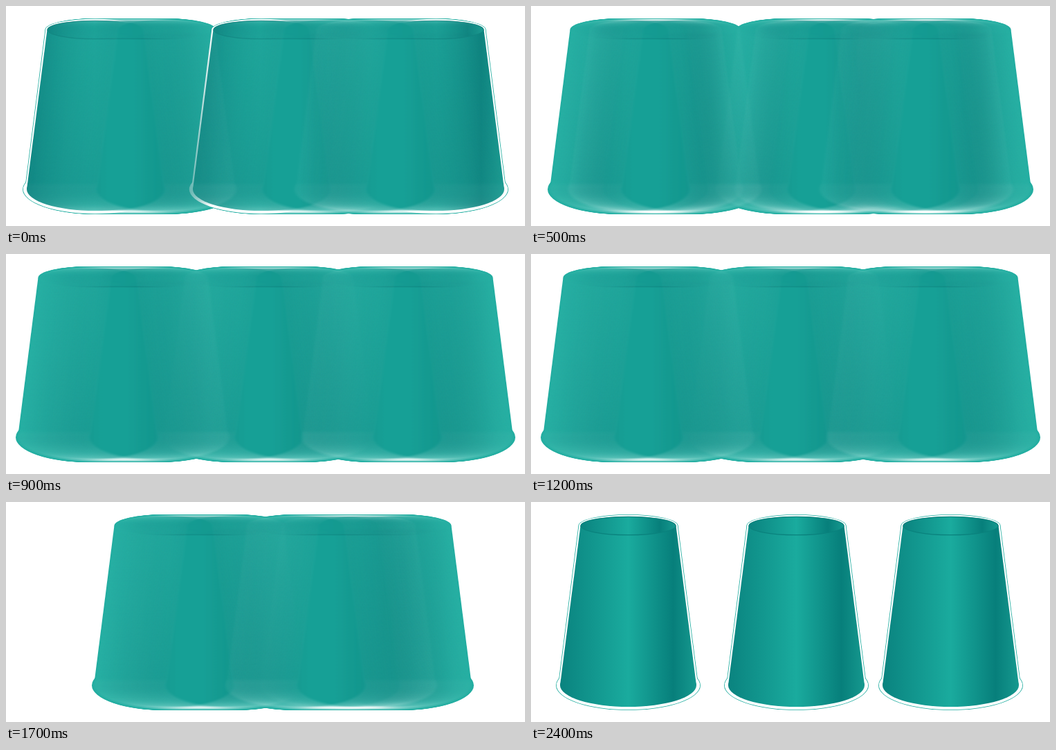
Animation of 750 by 318 pixels, one loop 2900 ms. Source, as an HTML page with a canvas:

```html
<!DOCTYPE html>
<html lang="en">
<head>
<meta charset="utf-8">
<title>Shuffling cups</title>
<style>
  html, body { margin: 0; width: 100%; height: 100%; overflow: hidden; background: #fff; }
  canvas { display: block; }
</style>
</head>
<body>
<canvas id="stage" width="750" height="318"></canvas>
<script>
const WIDTH = 750, HEIGHT = 318;
const EDGE = '#20ada0', RIM = '#0a827d';
const REACH = 51.5; // half the distance a cup travels in one blurred pose
const SLOT = 100, LOOP = 2900;

function newLayer(width = WIDTH) {
  const canvas = document.createElement('canvas');
  canvas.width = width;
  canvas.height = HEIGHT;
  return canvas.getContext('2d');
}

function fillTapered(ctx, x, top, bottom) {
  ctx.beginPath();
  ctx.ellipse(x, top.y, top.rx, top.ry, 0, 0, 2 * Math.PI);
  ctx.fill();
  ctx.beginPath();
  ctx.moveTo(x - top.rx, top.y);
  ctx.lineTo(x + top.rx, top.y);
  ctx.lineTo(x + bottom.side, bottom.y);
  ctx.lineTo(x - bottom.side, bottom.y);
  ctx.fill();
  ctx.beginPath();
  ctx.ellipse(x, bottom.y, bottom.rx, bottom.ry, 0, 0, 2 * Math.PI);
  ctx.fill();
}

function fillOutline(ctx, x, color, inset = 0) {
  ctx.fillStyle = color;
  fillTapered(ctx, x,
    { y: 34, rx: 72 - inset, ry: 16 - inset },
    { y: 265, rx: 104.5 - inset, ry: 36 - inset, side: 101.5 - inset });
}

function shading(ctx, x, halfWidth) {
  const gradient = ctx.createLinearGradient(x - halfWidth, 0, x + halfWidth, 0);
  gradient.addColorStop(0, '#0a837f');
  gradient.addColorStop(0.5, '#1aab9e');
  gradient.addColorStop(0.83, '#077f7b');
  gradient.addColorStop(1, '#16998f');
  return gradient;
}

function drawCup(ctx, x) {
  fillOutline(ctx, x, '#fff', 0.8);
  ctx.fillStyle = shading(ctx, x, 98.5);
  fillTapered(ctx, x,
    { y: 34.5, rx: 69, ry: 13.5 },
    { y: 265, rx: 98.5, ry: 31, side: 98.5 });
  ctx.fillStyle = shading(ctx, x, 69);
  ctx.strokeStyle = RIM;
  ctx.lineWidth = 1.2;
  ctx.beginPath();
  ctx.ellipse(x, 34.5, 68.4, 13.2, 0, 0, 2 * Math.PI);
  ctx.fill();
  ctx.stroke();
}

// Averages a cup over its travel by repeatedly mixing two shifted copies.
const SMEAR_WIDTH = 360;
function smearedCup(reach) {
  let layer = newLayer(SMEAR_WIDTH);
  drawCup(layer, SMEAR_WIDTH / 2);
  for (let shift = reach / 2; shift > 0.4; shift /= 2) {
    const mixed = newLayer(SMEAR_WIDTH);
    mixed.globalCompositeOperation = 'lighter';
    mixed.globalAlpha = 0.5;
    mixed.drawImage(layer.canvas, -shift, 0);
    mixed.drawImage(layer.canvas, shift, 0);
    layer = mixed;
  }
  return layer.canvas;
}

const longSmear = smearedCup(REACH), shortSmear = smearedCup(25);

function drawSmear(ctx, smear, x) {
  ctx.drawImage(smear, x - SMEAR_WIDTH / 2, 0);
}

// Centers are listed from the rearmost cup to the front one.
function blurredPose(centers, drawUnder = () => {}) {
  const ctx = newLayer();
  for (const x of centers)
    for (let dx = -REACH; dx <= REACH; dx++) fillOutline(ctx, x + dx, EDGE);
  drawUnder(ctx);
  for (const x of centers) drawSmear(ctx, longSmear, x);
  return ctx.canvas;
}

function restingPose(centers) {
  const ctx = newLayer();
  for (const x of centers) {
    fillOutline(ctx, x, EDGE);
    drawCup(ctx, x);
  }
  return ctx.canvas;
}

const spread = [420, 180, 570];
const poses = {
  S: blurredPose(spread, ctx => [368.5, 128.5, 621.5].forEach(x => drawCup(ctx, x))),
  A: blurredPose(spread, ctx => {
    ctx.globalAlpha = 0.8;
    spread.forEach(x => drawSmear(ctx, shortSmear, x));
    ctx.globalAlpha = 1;
  }),
  B: blurredPose([520, 280, 470]),
  C: blurredPose([380, 170, 580]),
  R: restingPose([140.5, 383.5, 606.5])
};
const ORDER = 'SBCABACBBCAACABCABCABCBAR'; // one pose per slot, the last one held

const stage = document.getElementById('stage').getContext('2d');
const start = performance.now();

function render() {
  const time = (performance.now() - start) % LOOP;
  const slot = Math.min(Math.floor(time / SLOT), ORDER.length - 1);
  stage.fillStyle = '#fff';
  stage.fillRect(0, 0, WIDTH, HEIGHT);
  stage.drawImage(poses[ORDER[slot]], 0, 0);
  requestAnimationFrame(render);
}
render();
</script>
</body>
</html>
```
